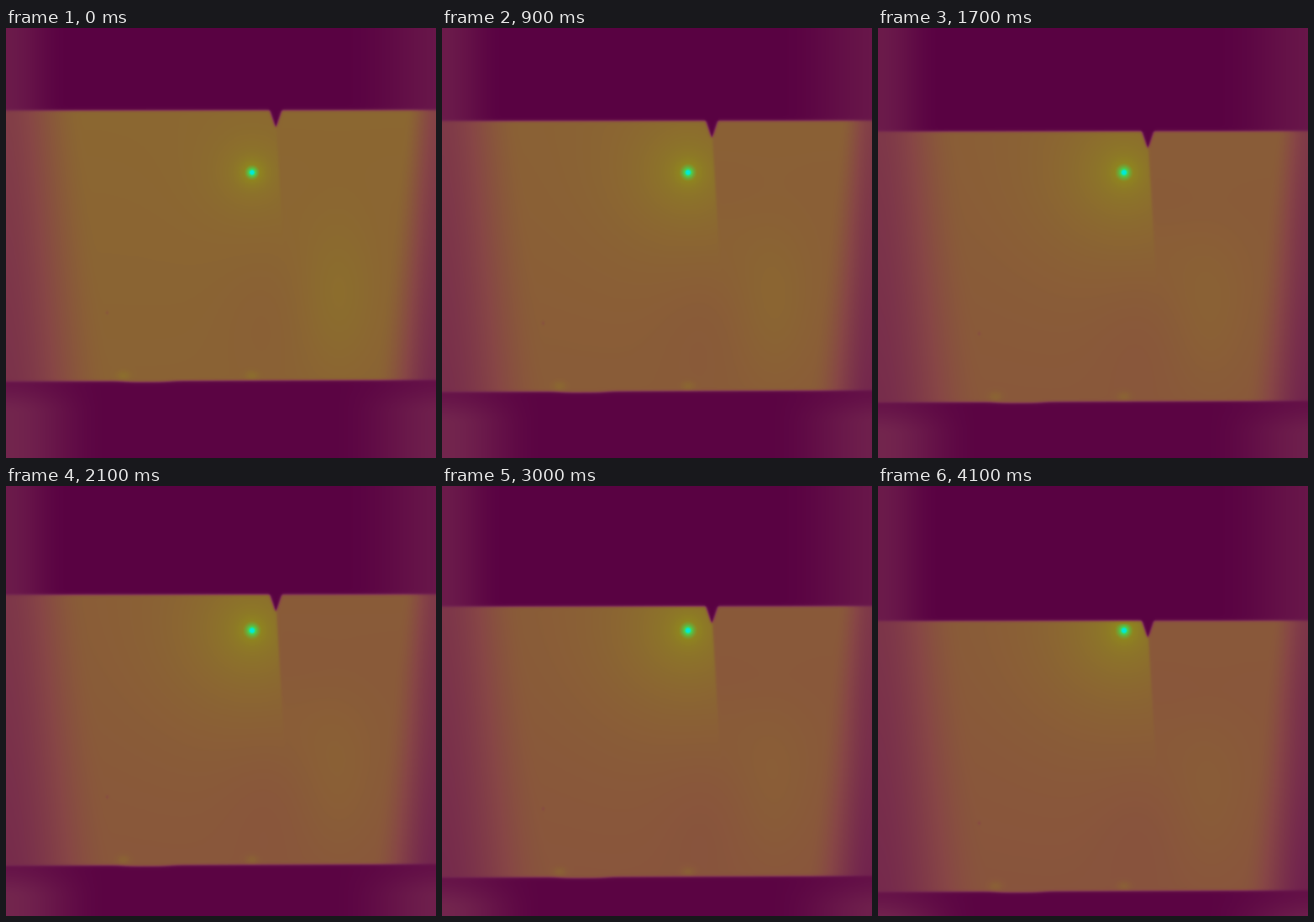
Animation of 512 by 512 pixels, one loop 4200 ms. Source, as a matplotlib script:

```python
import numpy as np
import matplotlib.pyplot as plt
from matplotlib.animation import FuncAnimation
from matplotlib.colors import LinearSegmentedColormap

SIZE = 512
TICKS, TICK_MS = 42, 100
TOP, HEIGHT, SPEED = 98, 322, 1.5625
SPOT = 293, 172

heat = LinearSegmentedColormap.from_list("heat", [
    (0.00, "#580042"),
    (0.22, "#72244e"),
    (0.45, "#874646"),
    (0.85, "#8f8420"),
    (0.95, "#4bcd50"),
    (1.00, "#00ebd7"),
], N=1024)

y, x = np.mgrid[0:SIZE, 0:SIZE] + 0.5


def smooth(u):
    u = np.clip(u, 0, 1)
    return u * u * (3 - 2 * u)


def edge(d, width=1.8):
    """Soft step: 0 for negative distance, 1 for positive."""
    return 0.5 + 0.5 * np.tanh(d / width)


def blob(cx, cy, sx, sy):
    return np.exp(-((x - cx) / sx) ** 2 - ((y - cy) / sy) ** 2)


def falloff(dist, floor, width):
    return floor + (1 - floor) * smooth(dist / width)


# The camera's darkened sides stay fixed while the plate moves.
depth = np.clip((y - TOP) / HEIGHT, 0, 1.2)
sides = (falloff(x, 0.60 - 0.10 * depth, 92 + 35 * depth)
         * falloff(SIZE - x, 0.66 - 0.24 * depth, 36 + 38 * depth))
radius = np.hypot(x - SPOT[0], y - SPOT[1])


def background(bottom):
    upper = 0.15 * smooth(1 - x / 75) + 0.13 * smooth((x - 400) / 130)
    lower = 0.20 * smooth(1 - x / 120) + 0.17 * smooth((x - 390) / 135)
    lower = lower * (0.45 + 0.55 * smooth((y - bottom) / 40)) + 0.015
    return 0.015 + np.where(y < bottom - HEIGHT / 2, upper, lower)


def spot_share(step, rel):
    """Share of the full heat around the spot; the crack holds it back."""
    grown = 1 - np.exp(-step / 10)
    wide = 0.5 + 0.1 * grown
    glow = wide * np.exp(-radius / (30 + 45 * grown))
    core = np.exp(-(radius / 14) ** 2) + np.exp(-(radius / 5) ** 2)
    crack = 322 + 0.06 * (rel - 19)
    passed = smooth((rel - 80) / 130)
    return (glow * (1 - edge(x - crack) * (1 - passed))
            + core * (1 - wide) / 2)


def plate_heat(step, top):
    rel = y - top
    cooling = np.exp(-step / 14)
    base = 0.55 + 0.1 * cooling + 0.03 * (0.5 - rel / HEIGHT)
    base += (0.03 + 0.03 * cooling) * blob(395, top + 225, 45, 90)
    base -= 0.02 * blob(310, top + 245, 55, 80)
    base -= 0.06 * blob(120.5, top + 241, 2, 2.5)
    for cx in (140, 293):
        base += 0.07 * blob(cx, top + HEIGHT - 6, 8, 6)
    base *= sides
    return base + (1.02 - base) * spot_share(step, rel)


def plate_mask(top, bottom):
    tilt = (x - 256) / SIZE
    sag = 1.2 * np.exp(-((x - 168) / 30) ** 4)
    rel = y - top
    mask = edge(rel + 0.5 * tilt) * edge(bottom - 2 * tilt + sag - y)
    half = 1.2 + 6 * np.clip(1 - rel / 18, 0, 1.2)
    notch = edge(half - abs(x - 321.3)) * edge(19 - rel)
    return mask * (1 - notch)


def field(tick):
    step = max(0, tick - 1)
    top = TOP + SPEED * step
    bottom = top + HEIGHT
    back = background(bottom)
    return back + (plate_heat(step, top) - back) * plate_mask(top, bottom)


fig = plt.figure(figsize=(5.12, 5.12), dpi=100)
ax = fig.add_axes([0, 0, 1, 1])
ax.axis("off")
image = ax.imshow(field(0), cmap=heat, vmin=0, vmax=1,
                  interpolation="nearest", aspect="auto")


def update(tick):
    image.set_data(field(tick))
    return [image]


anim = FuncAnimation(fig, update, frames=TICKS, interval=TICK_MS,
                     repeat=True, repeat_delay=0, blit=False)
plt.show()
```
